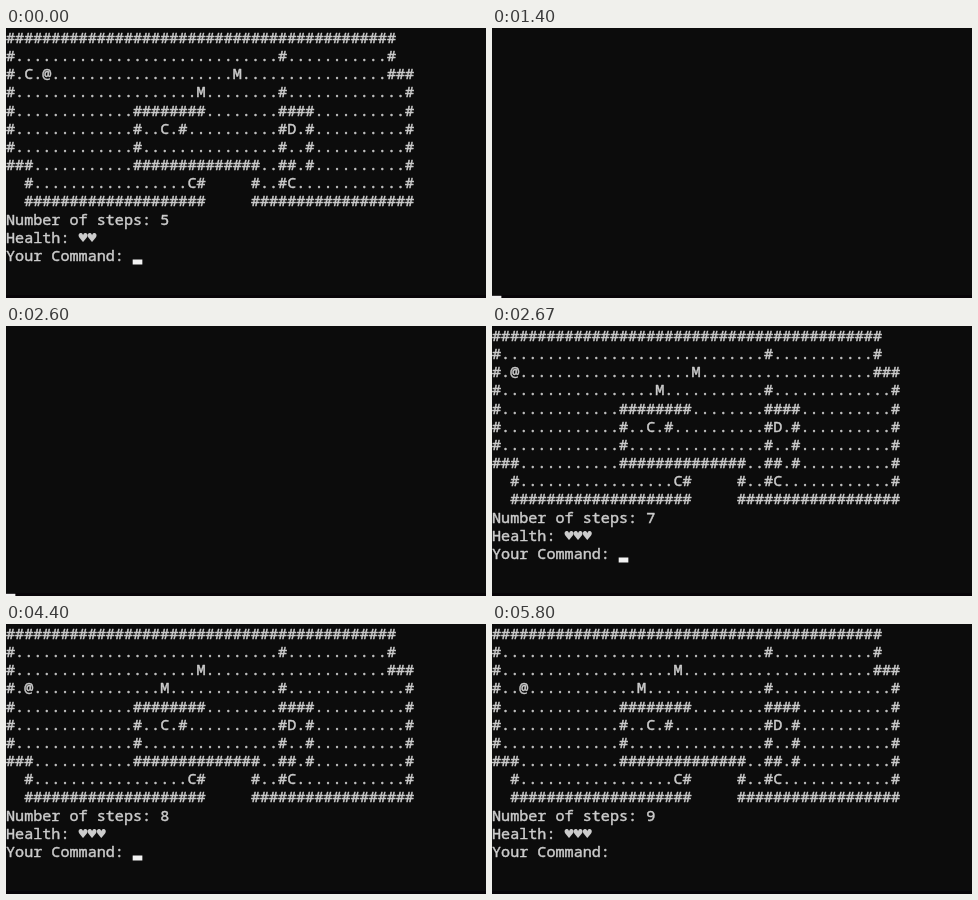
Write an HTML page with a canvas that moves like this. It is 480 px wide and 270 px high and loops after 6340 ms.

```html
<!DOCTYPE html>
<html lang="en">
<head>
<meta charset="utf-8">
<title>Console maze</title>
<style>
  html, body { margin: 0; width: 100%; height: 100%; overflow: hidden; background: #0c0c0c; }
  canvas { display: block; }
</style>
</head>
<body>
<canvas id="stage" width="480" height="270"></canvas>
<script>
const ctx = document.getElementById('stage').getContext('2d');
const LOOP = 6340;
const CELL_W = 9.07, LINE_H = 18.15, BASELINE = 15;
const INK = '#cccccc';

const wall = n => '#'.repeat(n);
const floor = n => '.'.repeat(n);
const gap = n => ' '.repeat(n);

const MAZE = [
  wall(43),
  '#' + floor(29) + '#' + floor(11) + '#',
  '#' + floor(41) + '###',
  '#' + floor(29) + '#' + floor(13) + '#',
  '#' + floor(13) + wall(8) + floor(8) + wall(4) + floor(10) + '#',
  '#' + floor(13) + '#..C.#' + floor(10) + '#D.#' + floor(10) + '#',
  '#' + floor(13) + '#' + floor(15) + '#..#' + floor(10) + '#',
  '###' + floor(11) + wall(14) + '..##.#' + floor(10) + '#',
  '  #' + floor(17) + 'C#' + gap(5) + '#..#C' + floor(12) + '#',
  '  ' + wall(20) + gap(5) + wall(18)
];

// Each turn moves both monsters one cell to the left.
const TURNS = [
  { at: 0,    steps: 5, health: 2, player: [4, 2], coin: true },
  { at: 530,  steps: 6, health: 2, player: [3, 2], coin: true },
  { at: 1470, steps: 7, health: 2, player: [2, 2] },
  { at: 2670, steps: 7, health: 3, player: [2, 2] },
  { at: 4330, steps: 8, health: 3, player: [2, 3] },
  { at: 5200, steps: 9, health: 3, player: [3, 3] }
];
const CLEARED = [[470, 530], [1400, 1470], [2600, 2670], [4270, 4330], [5130, 5200]];
const CARET_OFF = [[2070, 2600], [3670, 4200], [5800, LOOP]];
const LOW_CARET = [1400, 2600, 5130];

const spanAt = (spans, t) => spans.find(([from, to]) => t >= from && t < to);

function screenLines(turn, index) {
  const rows = MAZE.map(row => [...row]);
  const put = (col, row, mark) => { rows[row][col] = mark; };
  if (turn.coin) put(2, 2, 'C');
  put(25 - index, 2, 'M');
  put(21 - index, 3, 'M');
  put(...turn.player, '@');
  return [
    ...rows,
    'Number of steps: ' + turn.steps,
    'Health: ' + '♥'.repeat(turn.health),
    'Your Command: '
  ];
}

// A thin outline gives the glyphs the weight of console type.
function drawLine(line, row) {
  const y = BASELINE + row * LINE_H;
  [...line].forEach((mark, col) => {
    if (mark === ' ') return;
    const x = (col + 0.5) * CELL_W;
    ctx.fillText(mark, x, y);
    if (mark !== '♥') ctx.strokeText(mark, x, y);
  });
}

function drawCaret(col, row) {
  ctx.fillStyle = '#f2f2f2';
  ctx.fillRect(col * CELL_W - 0.3, 231.5 + (row - 12) * LINE_H, CELL_W + 0.6, 5);
}

function draw(t) {
  ctx.fillStyle = '#0c0c0c';
  ctx.fillRect(0, 0, 480, 270);
  ctx.fillStyle = '#080508';
  ctx.fillRect(0, 267, 480, 3);

  const cleared = spanAt(CLEARED, t);
  if (cleared) {
    if (LOW_CARET.includes(cleared[0])) drawCaret(0, 14);
    return;
  }

  const index = TURNS.findLastIndex(turn => t >= turn.at);
  ctx.font = '15.12px "Noto Sans Mono", "DejaVu Sans Mono", monospace';
  ctx.textAlign = 'center';
  ctx.lineJoin = 'round';
  ctx.lineWidth = 0.45;
  ctx.fillStyle = ctx.strokeStyle = INK;
  screenLines(TURNS[index], index).forEach(drawLine);
  if (!spanAt(CARET_OFF, t)) drawCaret(14, 12);
}

const start = performance.now();
function tick() {
  draw((performance.now() - start) % LOOP);
  requestAnimationFrame(tick);
}
tick();
</script>
</body>
</html>
```
